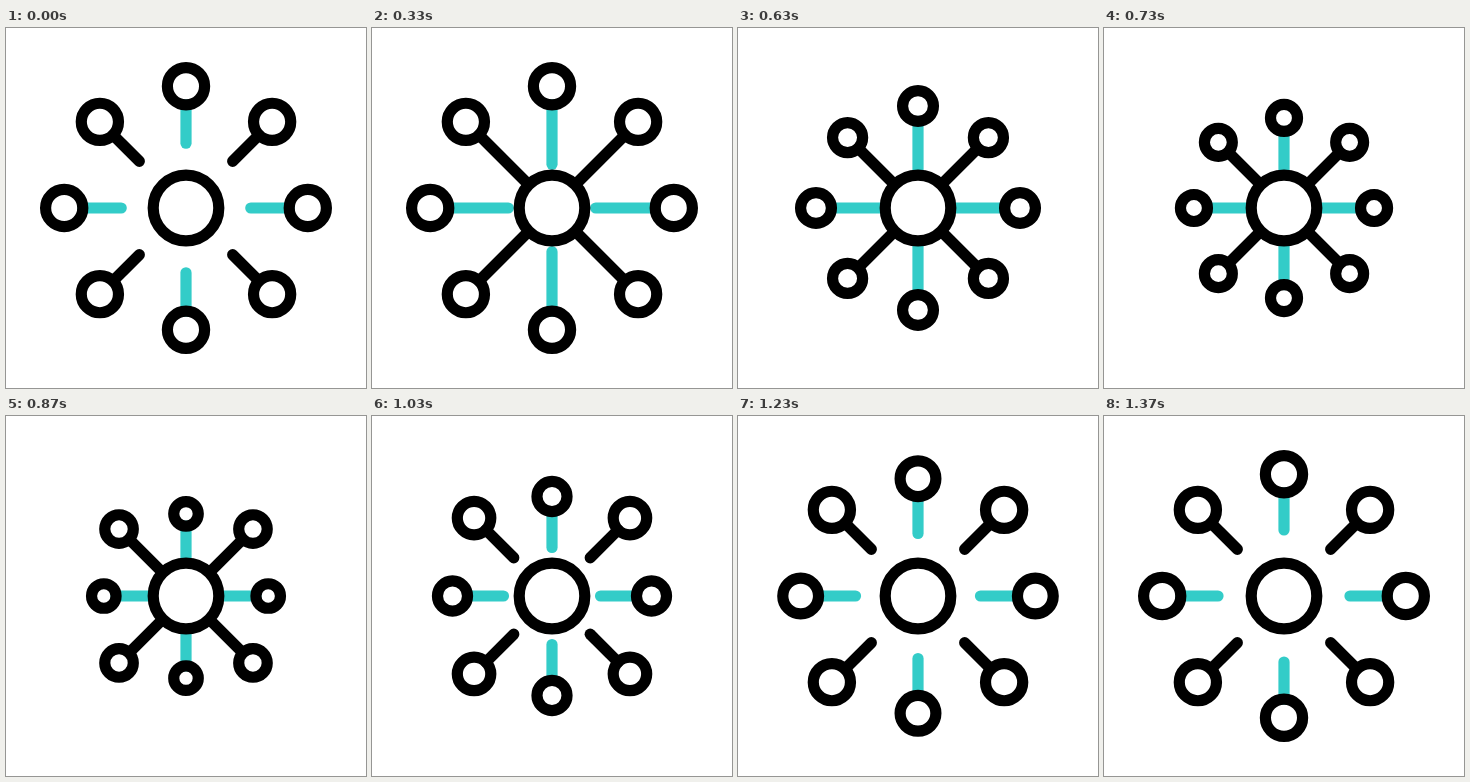
An HTML page for the animation above (1.67 s loop, 360x360 px).

```html
<!DOCTYPE html>
<html lang="en">
<head>
<meta charset="utf-8">
<title>Hub and nodes</title>
<style>
  html, body { margin: 0; width: 100%; height: 100%; overflow: hidden; background: #fff; }
  svg { display: block; width: 100vw; height: 100vh; }
  line, circle { fill: none; stroke: #000; stroke-width: 11.2; stroke-linecap: round; }
  .teal { stroke: #33ccc8; }
</style>
</head>
<body>
<svg viewBox="0 0 360 360">
  <g id="hub" transform="translate(180 180)"></g>
</svg>
<script>
const LOOP = 1670, LAST = 41;
const REACH = 121.8, NODE = 18.6, TIP = 66, TIP_TRAVEL = 31;

// Timings in steps of 1/30 s: [start, end, initial slope]
const AXIS = { travel: 39.6, grow: [-1, 17, 0.2], pull: [12, 26, 0], push: [26, 41, 0.4] };
const DIAG = { travel: 30, grow: [0, 10, 0], pull: [10, 23.5, 0], push: [23.5, 36.5, 0] };

const hub = document.getElementById('hub');

function add(parent, tag, attrs = {}) {
  const el = document.createElementNS('http://www.w3.org/2000/svg', tag);
  for (const name in attrs) el.setAttribute(name, attrs[name]);
  return parent.appendChild(el);
}

const spokes = Array.from({ length: 8 }, (_, i) => {
  const g = add(hub, 'g', { transform: `rotate(${i * 45})` });
  const diagonal = i % 2;
  return {
    motion: diagonal ? DIAG : AXIS,
    line: add(g, 'line', diagonal ? {} : { class: 'teal' }),
    node: add(g, 'circle')
  };
});
add(hub, 'circle', { r: 32.8 });

function ease(step, [start, end, slope]) {
  const u = Math.min(1, Math.max(0, (step - start) / (end - start)));
  const v = 1 - u;
  return 3 * v * v * u * slope + 3 * v * u * u + u * u * u;
}

function draw(step) {
  for (const { motion, line, node } of spokes) {
    const back = 1 - ease(step, motion.push);
    const shift = motion.travel * ease(step, motion.pull) * back;
    const reach = REACH - shift;
    const r = NODE - 0.16 * shift;
    line.setAttribute('x1', TIP - TIP_TRAVEL * ease(step, motion.grow) * back);
    line.setAttribute('x2', reach - r);
    node.setAttribute('cx', reach);
    node.setAttribute('r', r);
  }
}

const begin = performance.now();
function tick() {
  const t = (performance.now() - begin) % LOOP;
  draw(Math.min(LAST, Math.floor(t * 0.03 + 0.1)));
  requestAnimationFrame(tick);
}
tick();
</script>
</body>
</html>
```
